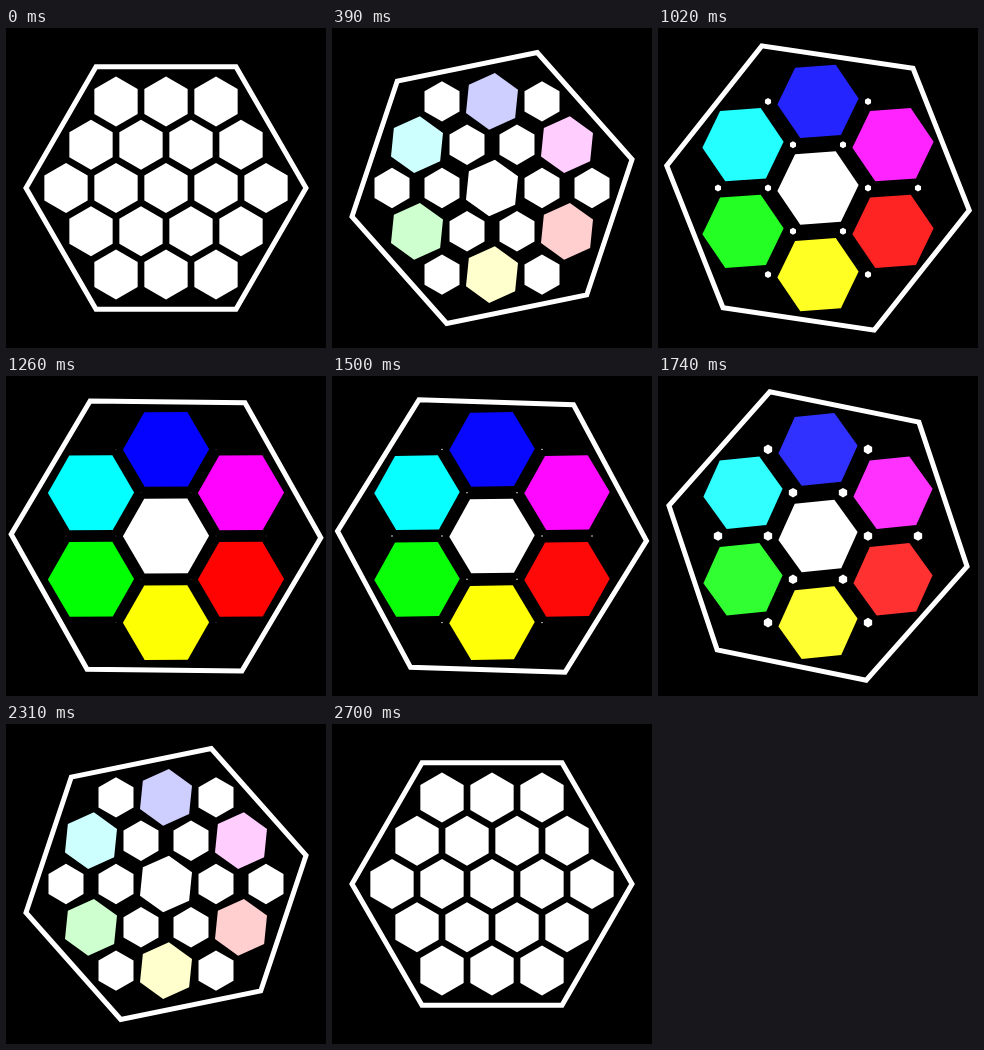
Recreate the animation shown at these times as an HTML page with a canvas. Size 320 px wide and 320 px high, loop 2.73 s.

```html
<!DOCTYPE html>
<html>
<head>
<meta charset="utf-8">
<style>
  html, body { margin: 0; height: 100%; overflow: hidden; background: #000; }
  canvas { display: block; }
</style>
</head>
<body>
<canvas width="320" height="320"></canvas>
<script>
const ctx = document.querySelector('canvas').getContext('2d');
const STEP = 30, STEPS = 91, PITCH = 50, SMALL = 25, BIG = SMALL * Math.sqrt(3);
const rad = deg => deg * Math.PI / 180;

// Hexagonal grid with two rings; every third cell grows, the others shrink.
const cells = [];
for (let r = -2; r <= 2; r++) {
  for (let q = -2; q <= 2; q++) {
    if (Math.abs(q + r) > 2) continue;
    const x = PITCH * (q + r / 2), y = PITCH * r * Math.sqrt(3) / 2;
    cells.push({
      x, y,
      grows: (q - r) % 3 === 0,
      hue: q || r ? Math.atan2(y, x) * 180 / Math.PI - 30 : null
    });
  }
}

function hexagon(x, y, radius, turn) {
  ctx.beginPath();
  for (let i = 0; i < 6; i++) {
    const a = rad(turn + 60 * i);
    ctx.lineTo(x + radius * Math.cos(a), y + radius * Math.sin(a));
  }
  ctx.closePath();
}

function draw(now) {
  const step = Math.floor(now / STEP) % STEPS;
  const s = (1 - Math.cos(2 * Math.PI * step / (STEPS - 1))) / 2;

  ctx.setTransform(1, 0, 0, 1, 0, 0);
  ctx.fillStyle = '#000';
  ctx.fillRect(0, 0, 320, 320);
  ctx.translate(160, 160);

  ctx.strokeStyle = '#fff';
  ctx.lineWidth = 5;
  hexagon(0, 0, 140 + 15 * s, -60 * s);
  ctx.stroke();

  for (const { x, y, grows, hue } of cells) {
    const tinted = grows && hue !== null;
    ctx.fillStyle = tinted ? `hsl(${(hue + 360) % 360}, 100%, ${100 - 50 * s}%)` : '#fff';
    if (grows) hexagon(x, y, SMALL + (BIG - SMALL) * s, 30 + 30 * s);
    else hexagon(x, y, SMALL * (1 - s), 30);
    ctx.fill();
  }
}

function loop() {
  draw(performance.now());
  requestAnimationFrame(loop);
}
loop();
</script>
</body>
</html>
```
